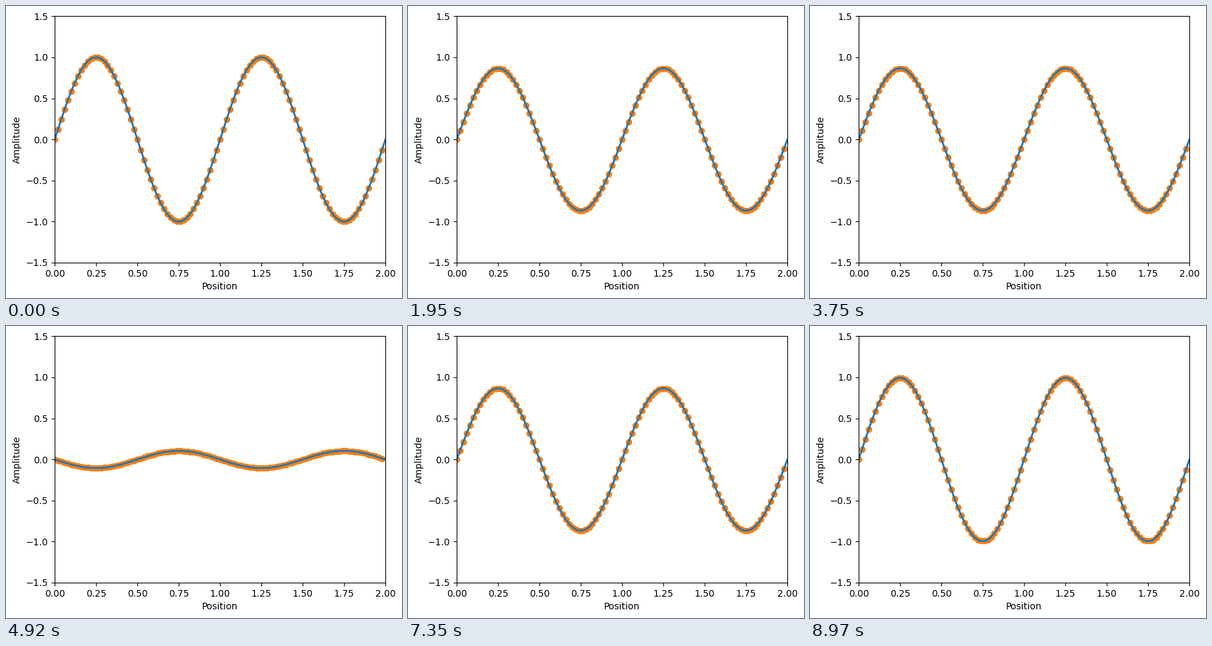
Animation of 594x438 px, one loop 9 s. Source, as a matplotlib script:

```python
import numpy as np
import matplotlib.pyplot as plt
from matplotlib.animation import FuncAnimation

W, H, DPI = 594, 438, 100
LEFT, TOP, AX_W, AX_H = 73.1, 15.4, 496, 369.6   # axes box in pixels
FRAMES, PERIOD, INTERVAL = 300, 60, 30

plt.rcParams["font.family"] = "DejaVu Sans"

fig = plt.figure(figsize=(W / DPI, H / DPI), dpi=DPI, facecolor="white")
ax = fig.add_axes([LEFT / W, 1 - (TOP + AX_H) / H, AX_W / W, AX_H / H])
ax.set(xlim=(0, 2), ylim=(-1.5, 1.5), xlabel="Position", ylabel="Amplitude")


def wave(x, frame):
    """Standing wave: fixed shape, oscillating amplitude."""
    return np.sin(2 * np.pi * x) * np.cos(2 * np.pi * frame / PERIOD)


x_line = np.linspace(0, 2, 1000)
x_dots = np.arange(100) * 0.02

dots = ax.scatter(x_dots, wave(x_dots, 0), color="C1", zorder=1)
line, = ax.plot(x_line, wave(x_line, 0), color="C0", lw=2, zorder=2)


def update(frame):
    line.set_ydata(wave(x_line, frame))
    dots.set_offsets(np.column_stack([x_dots, wave(x_dots, frame)]))
    return dots, line


anim = FuncAnimation(fig, update, frames=FRAMES, interval=INTERVAL,
                     repeat=True, repeat_delay=0, blit=False)
plt.show()
```
